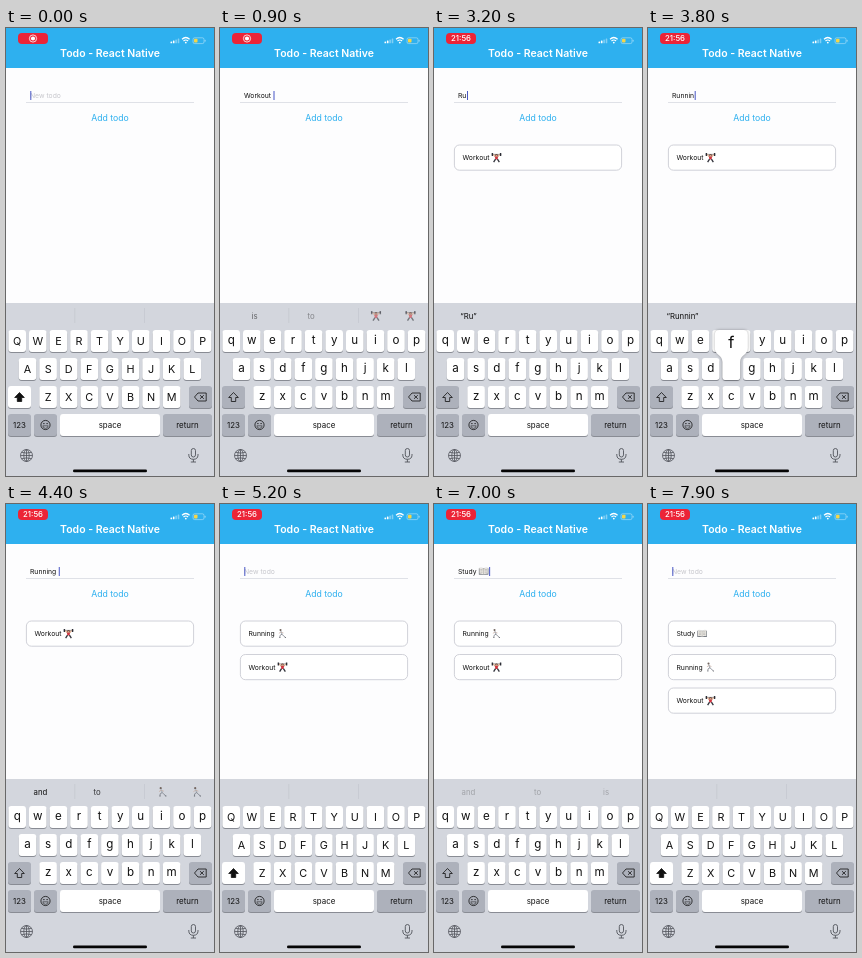
Recreate the animation shown at these times as an HTML page with a canvas. Size 208x448 px, loop 8000 ms.

```html
<!DOCTYPE html>
<html>
<head>
<meta charset="utf-8">
<style>
html, body { margin: 0; width: 100%; height: 100%; overflow: hidden; background: #fdfdfe }
canvas { display: block; width: 208px; height: 448px }
</style>
</head>
<body>
<canvas id="stage"></canvas>
<script>
const LOOP = 8000, BLUE = '#2eb0ef', INK = '#111', GREY_KEY = '#adb1bb';
const canvas = document.getElementById('stage'), c = canvas.getContext('2d');
const dpr = window.devicePixelRatio || 1;
canvas.width = 208 * dpr;
canvas.height = 448 * dpr;

// Each step changes part of the state: text, bar (suggestions), key, items, tap.
const steps = [];
const at = (t, change) => steps.push([t, change]);
const type = (times, word, guess) => times.forEach((t, i) => {
  const text = word.slice(0, i + 1);
  at(t, { text, key: word[i], bar: ['“' + text + '”', i > 1 ? guess : '', ''], hot: i > 3 && text !== guess });
  at(t + 100, { key: '' });
});
const submit = (t, items) => {
  at(t - 200, { tap: true });
  at(t, { tap: false, text: '', emoji: '', bar: [], items });
  at(t + 200, { bar: ['I', 'The', 'I’m'], born: t + 200 });
};
const space = (t, text, bar, pick) => {
  at(t, { text, key: ' ', bar, born: t, hot: false });
  at(t + 100, { key: '' });
  at(pick, { emoji: text.trim(), bar: ['and', 'to', 'is'], born: pick });
};

at(0, { text: '', emoji: '', bar: [], key: '', items: [], tap: false, hot: false, born: -999 });
type([100, 200, 300, 400, 500, 600, 700], 'Workout', 'Workout');
space(800, 'Workout ', ['is', 'to', 'Workout'], 1400);
submit(2200, ['Workout']);
type([2900, 3100, 3250, 3400, 3550, 3700], 'Runnin', 'Running');
at(3800, { key: 'f', hot: false, bar: ['“Runnin”', '', ''] });
at(3900, { key: '', text: 'Runninf', bar: ['“Runninf”', 'Running', ''], hot: true });
space(4100, 'Running ', ['and', 'to', 'Running'], 4500);
submit(5100, ['Running', 'Workout']);
type([5700, 5900, 6000, 6100, 6300], 'Srudy', 'Study');
space(6600, 'Study ', ['and', 'for', 'Study'], 7000);
submit(7800, ['Study', 'Running', 'Workout']);
steps.sort((a, b) => a[0] - b[0]);

function box(x, y, w, h, r, fill, stroke) {
  c.beginPath();
  c.roundRect(x, y, w, h, r);
  if (fill) { c.fillStyle = fill; c.fill(); }
  if (stroke) { c.strokeStyle = stroke; c.stroke(); }
}
function label(text, x, y, size, color = INK, align = 'center', weight = 400) {
  c.font = `${weight} ${size}px Inter, "Liberation Sans", sans-serif`;
  c.textAlign = align;
  c.textBaseline = 'alphabetic';
  c.fillStyle = color;
  c.fillText(text, x, y);
  return c.measureText(text).width;
}
function path(d, color, width, fill) {
  const p = new Path2D(d);
  c.strokeStyle = color;
  c.lineWidth = width;
  if (fill) { c.fillStyle = fill; c.fill(p); }
  if (width) c.stroke(p);
}
function disc(x, y, r, color) {
  c.beginPath();
  c.arc(x, y, r, 0, 7);
  c.fillStyle = color;
  c.fill();
}
function moved(x, y, scale, draw) {
  c.save();
  c.translate(x, y);
  c.scale(scale, scale);
  draw();
  c.restore();
}

// Small pictures in a 10 by 10 box centred on x, y.
const pictures = {
  Workout() {
    path('M-5 -3.5H5', '#555', .6);
    path('M-4.3 -5V-1.8M4.3 -5V-1.8', '#2b2d35', 1.5);
    path('M-3.3 -3.4L-1 -.5M3.3 -3.4L1 -.5', '#d99a78', 1.1);
    path('M-1.6 -1.2H1.6L1.2 2H-1.2Z', '', 0, '#d3343f');
    path('M-1 1.6L-3 4.7M1 1.6L3 4.7', '#33343c', 1.4);
    disc(0, -2.6, 1.4, '#5b3830');
    disc(0, -2.2, 1, '#dda181');
  },
  Running() {
    disc(-1.3, -3.8, 1.1, '#71655f');
    path('M-1 -2.5L.3 .5', '#aab4bd', 1.4);
    path('M-.8 -1.8L-3 -.4M-.5 -1.6L1.8 -.8', '#c5a79a', .7);
    path('M.3 .5L-1.8 1.8L-2 3.7M.3 .5L2 2.5L3.7 3.7', '#777b84', .8);
    path('M-2.6 4H-1.4M3.3 4H4.4', '#454850', .8);
  },
  Study() {
    path('M-5 -3H5V3.5H-5Z', '', 0, '#626873');
    path('M-4.4 -3.5Q-2 -4 0 -2.8Q2 -4 4.4 -3.5V2.6Q2 2.2 0 3.2Q-2 2.2 -4.4 2.6Z', '#aaa', .3, '#f6f3ec');
    path('M0 -2.8V3.2M-3.5 -2H-1M-3.5 -.5H-1M-3.5 1H-1M1 -2H3.5M1 -.5H3.5M1 1H3.5', '#858585', .5);
  }
};
const picture = (name, x, y, scale = 1) => moved(x, y, scale, pictures[name]);

function drawHeader(t) {
  c.fillStyle = BLUE;
  c.fillRect(0, 0, 208, 40);
  box(12, 5, 30, 11, 4, '#ec2437');
  if (t < 1500) {
    c.lineWidth = .8;
    c.strokeStyle = '#fff';
    c.beginPath();
    c.arc(27, 10.5, 3.6, 0, 7);
    c.stroke();
    disc(27, 10.5, 2.1, '#fff');
  } else label('21:56', 27, 13.4, 7.8, '#fff', 'center', 500);
  for (let i = 0; i < 4; i++) box(164.5 + i * 2.4, 13.5 - i, 1.6, 1.8 + i, .4, i < 2 ? '#fff' : '#ffffff66');
  path('M176 11.2Q179.8 7.8 183.6 11.2M177.5 13Q179.8 11 182.1 13', '#fff', 1.2);
  disc(179.8, 14.6, .9, '#fff');
  c.lineWidth = .6;
  box(187, 9.8, 11, 5.8, 1.6, null, '#ffffffa0');
  box(188, 10.8, 3.5, 3.8, .8, '#f5d648');
  box(198.7, 11.7, .8, 2, .4, '#ffffffa0');
  label('Todo - React Native', 104, 29.4, 10.5, '#fff', 'center', 600);
}

function drawForm(s) {
  let x = 24.3;
  if (s.text) x += label(s.text, 24, 69.7, 6.8, INK, 'left') + .3;
  else label('New todo', 24, 69.7, 6.8, '#c6c6cb', 'left');
  if (s.emoji) {
    picture(s.emoji, x + 4.5, 67.3, .95);
    x += 10;
  }
  c.fillStyle = '#4957c5';
  c.fillRect(x, 63, 1, 9);
  c.fillStyle = '#d9dbe2';
  c.fillRect(20, 74, 168, .8);
  c.globalAlpha = s.tap ? .3 : 1;
  label('Add todo', 104, 92.8, 8.7, BLUE);
  c.globalAlpha = 1;
  s.items.forEach((name, i) => {
    const y = 117 + i * 33.5;
    c.lineWidth = .8;
    box(20.4, y, 167.2, 25.2, 5, '#fff', '#c5c6ce');
    const w = label(name, 28.5, y + 15, 6.8, INK, 'left');
    picture(name, 28.5 + w + 7, y + 12.7, .95);
  });
}

function drawBar(s, t) {
  const [left = '', mid = '', right = ''] = s.bar, age = t - s.born;
  const reveal = Math.min(1, .25 + Math.max(0, age) / 300);
  if (!left || pictures[right]) {
    c.fillStyle = '#c3c6ce';
    c.fillRect(68.5, 280, .7, 15);
    c.fillRect(138, 280, .7, 15);
  }
  if (s.hot) box(69, 277.5, 69.5, 20, 4, '#e5e7eb');
  c.globalAlpha = reveal;
  label(left, 34.5, 290.7, 7.8);
  if (pictures[right]) {
    picture(right, 156, 288, 1);
    picture(right, 190.5, 288, 1);
    c.globalAlpha = Math.min(1, .2 + age / 500);
  } else label(right, 172, 290.7, 7.8);
  label(mid, pictures[right] ? 91 : 103.5, 290.7, 7.8);
  c.globalAlpha = 1;
}

function keycap(x, y, w, fill = '#fff') {
  box(x, y + .9, w, 22, 3, '#898c94');
  box(x, y, w, 22, 3, fill);
}

function popup(x, y, letter) {
  const top = y - 28;
  c.save();
  c.shadowColor = '#0005';
  c.shadowBlur = 3 * dpr;
  path(`M${x - 12} ${top}H${x + 12}Q${x + 16.5} ${top} ${x + 16.5} ${top + 5}V${top + 18}
    C${x + 16.5} ${top + 25} ${x + 8.8} ${top + 25} ${x + 8.8} ${top + 32}V${y + 19}
    Q${x + 8.8} ${y + 22} ${x + 6} ${y + 22}H${x - 6}Q${x - 8.8} ${y + 22} ${x - 8.8} ${y + 19}V${top + 32}
    C${x - 8.8} ${top + 25} ${x - 16.5} ${top + 25} ${x - 16.5} ${top + 18}V${top + 5}
    Q${x - 16.5} ${top} ${x - 12} ${top}Z`, '', 0, '#fff');
  c.restore();
  label(letter, x, top + 18, 16.5);
}

function drawKeys(s) {
  const caps = !s.text;
  let pressed;
  [['qwertyuiop', 11.2], ['asdfghjkl', 21.5], ['zxcvbnm', 42.1]].forEach(([row, start], r) => {
    const y = 302 + r * 28;
    [...row].forEach((ch, i) => {
      const x = start + i * 20.6;
      keycap(x - 8.8, y, 17.6);
      if (s.key.toLowerCase() === ch) pressed = [x, y, s.key];
      else label(caps ? ch.toUpperCase() : ch, x, y + (caps ? 15 : 14.4), caps ? 10.8 : 11.6);
    });
  });

  keycap(2, 358, 23, caps ? '#fff' : GREY_KEY);
  path('M13.5 364.5L18.3 369.5H15.7V373.5H11.3V369.5H8.7Z', INK, .8, caps ? INK : null);
  keycap(183, 358, 23, GREY_KEY);
  path('M192 365H200.2V373H192L188.5 369ZM194 367.2L197.8 370.8M197.8 367.2L194 370.8', INK, .8);

  keycap(2, 386, 23, GREY_KEY);
  label('123', 13.5, 399.8, 7.9);
  keycap(28, 386, 23, GREY_KEY);
  c.lineWidth = .8;
  c.strokeStyle = INK;
  c.beginPath();
  c.arc(39.5, 397, 4.6, 0, 7);
  c.stroke();
  disc(37.9, 395.6, .7, INK);
  disc(41.1, 395.6, .7, INK);
  path('M36.8 397.8H42.2Q41.7 400.4 39.5 400.4Q37.3 400.4 36.8 397.8Z', INK, .5);
  keycap(54, 386, 100, s.key === ' ' ? GREY_KEY : '#fff');
  label('space', 104, 399.5, 7.9);
  keycap(157, 386, 49, GREY_KEY);
  label('return', 181.5, 399.5, 7.9);

  moved(20.5, 427.5, 1, () => {
    c.lineWidth = .8;
    c.strokeStyle = '#51545b';
    [6, 2.7].forEach(rx => {
      c.beginPath();
      c.ellipse(0, 0, rx, 6, 0, 0, 7);
      c.stroke();
    });
    path('M-6 0H6M0 -6V6M-5 -3.2Q0 -1.6 5 -3.2M-5 3.2Q0 1.6 5 3.2', '#51545b', .8);
  });
  c.lineWidth = .9;
  box(185.3, 420.5, 4.2, 8.5, 2.1, null, '#51545b');
  path('M182.8 426V427.2Q183 431.3 187.4 431.3Q191.8 431.3 192 427.2V426M187.4 431.3V434M184.8 434H190', '#51545b', .9);
  box(67, 441.6, 74, 2.6, 1.3, '#050505');
  if (pressed) popup(...pressed);
}

function frame(now) {
  const t = now % LOOP;
  const s = Object.assign({}, ...steps.filter(e => e[0] <= t).map(e => e[1]));
  c.setTransform(dpr, 0, 0, dpr, 0, 0);
  c.fillStyle = '#fdfdfe';
  c.fillRect(0, 0, 208, 448);
  drawHeader(t);
  drawForm(s);
  c.fillStyle = '#d3d6dd';
  c.fillRect(0, 275, 208, 173);
  drawBar(s, t);
  drawKeys(s);
}
const start = performance.now();
function tick() {
  frame(performance.now() - start);
  requestAnimationFrame(tick);
}
tick();
</script>
</body>
</html>
```
